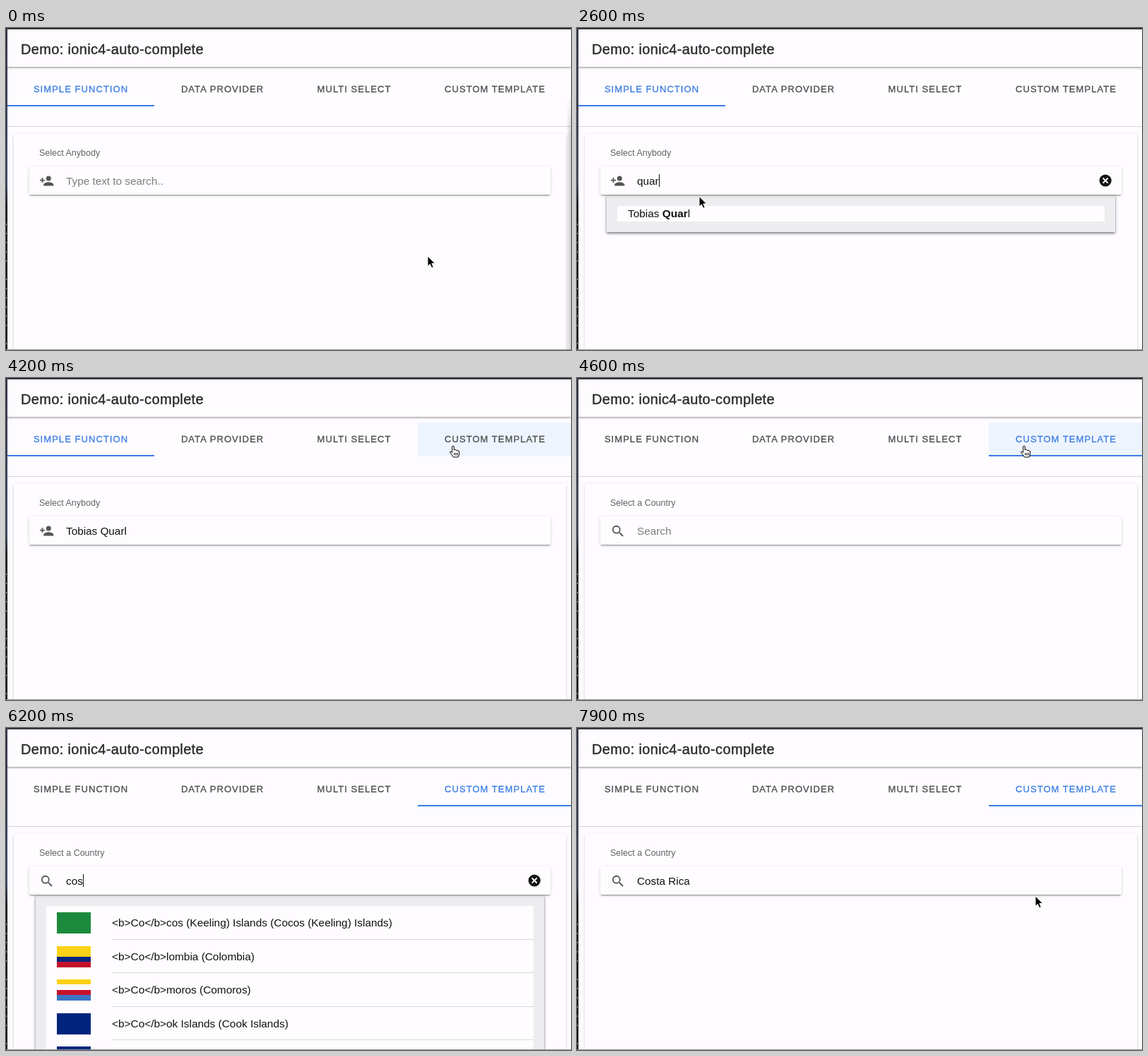
Animation, 800 px wide and 456 px high, one loop 8 s. Source, as an HTML page:

```html
<!DOCTYPE html>
<html lang="en">
<meta charset="utf-8">
<title>Auto-complete demo</title>
<style>
html, body { margin: 0; width: 100%; height: 100%; overflow: hidden; }
body { position: relative; background: #fefcff; color: #111; font: 15.3px "Liberation Sans", Arial, sans-serif; white-space: pre; }
div, svg { position: absolute; box-sizing: border-box; }
.raised { background: #fefcff; border-radius: 2px; box-shadow: 0 3px 1px -2px #0003, 0 2px 2px #00000024, 0 1px 5px #0000001f; }
#head { left: 0; top: 0; width: 800px; height: 55px; padding-left: 21px; font-size: 20px; line-height: 60px; letter-spacing: .34px; color: #2b2b2d; -webkit-text-stroke: .4px; box-shadow: 0 1px 3px #0007; }
#tabs { left: 0; top: 0; }
.tab { top: 63px; height: 48px; line-height: 47px; text-align: center; font-size: 13px; letter-spacing: 1.05px; color: #4c4b4e; -webkit-text-stroke: .3px; }
.tab.on { color: #3b7de4; border-bottom: 2px solid; }
.tab.hover { background: #eef4fe; }
#rule { left: 0; top: 139px; width: 800px; height: 1px; background: #d6d5d8; }
#card { left: 11px; top: 150px; width: 782px; height: 330px; }
#label { left: 47px; top: 167px; line-height: 20px; font-size: 12.5px; color: #626164; }
#list { left: 42px; top: 237px; width: 720px; padding: 15px; background: #edecee; box-shadow: 0 2px 3px #0006, 0 1px 5px #0003; }
.row { position: relative; height: 47.5px; line-height: 48px; padding-left: 93px; font-size: 15.4px; background: #fefcff; }
.row::after { content: ""; position: absolute; left: 93px; right: 0; bottom: 0; height: 1px; background: #d9d8db; }
.row.short { height: 22px; line-height: 22px; padding-left: 15px; }
.row.short::after { display: none; }
.flag { left: 15px; top: 9px; width: 48px; height: 30px; }
#field { left: 33px; top: 196px; width: 738px; height: 40px; padding-left: 52px; line-height: 41px; }
#hint { color: #7d7c7f; }
#caret { display: inline-block; width: 1px; height: 18px; margin-right: -1px; vertical-align: -3px; background: #111; }
#shade { left: 793px; top: 95px; width: 7px; height: 361px; background: linear-gradient(90deg, #0000, #0003); -webkit-mask: linear-gradient(#0000, #000 60px); mask: linear-gradient(#0000, #000 60px); }
#left { left: 0; top: 0; width: 2px; height: 456px; background: linear-gradient(#30334a, #3d4663 220px, #101014 255px); }
#left div { left: 0; width: 1px; height: 2px; background: #bbb; }
#top { left: 0; top: 0; width: 800px; height: 2px; background: linear-gradient(#25242b, #4b4a52); }
#bottom { left: 0; top: 455px; width: 800px; height: 1px; background: #929194; }
svg { left: 0; top: 0; width: 800px; height: 456px; }
</style>
<body>
<div id="rule"></div>
<div id="head">Demo: ionic4-auto-complete</div>
<div id="tabs"></div>
<div id="card" class="raised"></div>
<div id="label"></div>
<div id="list"></div>
<div id="field" class="raised"><span id="typed"></span><i id="caret"></i><span id="hint"></span></div>
<div id="shade"></div><div id="left"></div><div id="top"></div><div id="bottom"></div>
<svg>
  <g fill="#565558">
    <path id="person" transform="translate(47.1 205.9) scale(.88)" d="M15 12a4 4 0 1 0 0-8 4 4 0 0 0 0 8zM6 10V7H4v3H1v2h3v3h2v-3h3v-2zM15 14c-2.67 0-8 1.34-8 4v2h16v-2c0-2.66-5.33-4-8-4z"/>
    <path id="lens" transform="translate(47.3 206.2) scale(.9)" d="M15.5 14h-.8l-.3-.3a6.5 6.5 0 1 0-.7.7l.3.3v.8l5 5 1.5-1.5zM9.5 14a4.5 4.5 0 1 1 0-9 4.5 4.5 0 0 1 0 9z" fill-rule="evenodd"/>
  </g>
  <g id="clear" transform="translate(748.2 216)">
    <circle r="8.6" fill="#151517"/>
    <path d="M-3.5-3.5l7 7m0-7l-7 7" stroke="#fff" stroke-width="1.8"/>
  </g>
  <g id="pointer">
    <path id="arrow" d="M0 0v14.5l3.3-3.1 2.4 5.4 2.5-1.1-2.3-5.3h4.6z" fill="#000" stroke="#fff"/>
    <path id="hand" d="M-1.3 1q1.3-2 2.6 0v5l1-.7 1.7.4.5.8 1.8-.2.7 1.2 1.7.3v4l-1.4 4.2h-6.8l-2-3-2.8-3.3q-.5-2 1.5-1.4l1.5 1.5zM1.8 10v3.5m2.2-3.5v3.5m2.2-3.5v3.5" fill="#fff" stroke="#000"/>
    <path id="beam" d="M-2.5-8q2.5 0 2.5 2 0-2 2.5-2M0-6V6m-2.5 2q2.5 0 2.5-2 0 2 2.5 2" fill="none" stroke="#222"/>
  </g>
</svg>
<script>
const $ = id => document.getElementById(id);
const show = (id, on) => { $(id).style.display = on ? "" : "none"; };

const tabs = [["SIMPLE FUNCTION", 2, 210], ["DATA PROVIDER", 210, 403], ["MULTI SELECT", 403, 583], ["CUSTOM TEMPLATE", 583, 802]];
$("tabs").innerHTML = tabs.map(([name, from, to]) =>
  `<div class="tab" style="left:${from}px;width:${to - from}px">${name}</div>`).join("");

// Specks of the window behind
for (let i = 0; i < 14; i++) if (i % 7 != 5)
  $("left").innerHTML += `<div style="top:${277 + i * 13}px"></div>`;

const stripes = (...bands) => {
  let end = 0;
  return bands.map(([color, size]) => `${color} ${end}% ${end += size}%`).join();
};
const blue = "#00247d", red = "#c4122b", yellow = "#fcd116", white = "#fff";
const countries = [
  ["Cocos (Keeling) Islands", stripes(["#1c8a3c", 100])],
  ["Colombia", stripes([yellow, 50], [blue, 25], [red, 25])],
  ["Comoros", stripes([yellow, 25], [white, 25], [red, 25], ["#3a75c4", 25])],
  ["Cook Islands", stripes([blue, 100])],
  ["Costa Rica", stripes([blue, 17], [white, 16], [red, 34], [white, 16], [blue, 17])]
];
const personRow = `<div class="row short">Tobias <b>Quar</b>l</div>`;

// Typed text and its start time
const typing = [[0, ""], [1300, "q"], [1400, "qu"], [1600, "qua"], [1900, "quar"], [3200, "Tobias Quarl"],
  [4400, ""], [5700, "c"], [5800, "co"], [6200, "cos"], [6300, "cost"], [7000, "Costa Rica"]];

// Pointer path: time, x, y
const path = [[0, 597, 323], [100, 590, 318], [600, 180, 215], [2400, 180, 215], [2800, 166, 262], [3100, 166, 262],
  [3500, 419.5, 183], [4000, 585, 128], [4200, 633, 96], [4700, 633, 96], [5000, 320, 215], [6400, 320, 215],
  [6700, 219, 270], [7300, 219, 270], [7500, 275, 291], [7900, 649, 238], [8000, 649, 238]];

function pointerAt(t) {
  const i = path.findIndex(p => p[0] > t), [t0, x0, y0] = path[i - 1], [t1, x1, y1] = path[i];
  const u = (t - t0) / (t1 - t0), k = u * u * (3 - 2 * u);
  return [x0 + (x1 - x0) * k, y0 + (y1 - y0) * k];
}

function countryRows(query) {
  const n = query.length;
  return countries.filter(([name]) => name.toLowerCase().startsWith(query)).map(([name, flag]) =>
    `<div class="row"><div class="flag" style="background:linear-gradient(${flag})"></div>` +
    `&lt;b&gt;${name.slice(0, n)}&lt;/b&gt;${name.slice(n)} (${name})</div>`).join("");
}

let last = "";
function draw(now) {
  const t = Math.floor(now % 8000 / 100) * 100;
  const within = (from, to) => t >= from && t < to;
  const custom = t >= 4400;
  const text = typing.findLast(step => step[0] <= t)[1];

  $("label").textContent = custom ? "Select a Country" : "Select Anybody";
  $("typed").textContent = text;
  $("hint").textContent = text ? "" : custom ? "Search" : "Type text to search..";
  show("person", !custom);
  show("lens", custom);
  show("caret", within(700, 3200) || within(4900, 5100) || within(5600, 6700));
  show("clear", within(1300, 3200) || within(5700, 6700));
  show("shade", t < 700);

  const open = within(2300, 3200) || within(5900, 7000);
  const rows = !open ? "" : custom ? countryRows(t < 6400 ? "co" : "cost") : personRow;
  if (rows != last) $("list").innerHTML = last = rows;
  show("list", open);

  const [x, y] = pointerAt(t);
  const inTabs = y > 63 && y < 111;
  const kind = inTabs || open && y > 245 ? "hand" : y > 196 && y < 236 && x < 771 ? "beam" : "arrow";
  for (const id of ["arrow", "hand", "beam"]) show(id, id == kind);
  show("pointer", !within(1300, 2400) && !within(5100, 6400));
  $("pointer").setAttribute("transform", `translate(${x} ${y})`);

  [...$("tabs").children].forEach((tab, i) => {
    tab.classList.toggle("on", i == (custom ? 3 : 0));
    tab.classList.toggle("hover", inTabs && x >= tabs[i][1] && x < tabs[i][2]);
  });
}

const start = performance.now();
function loop() {
  draw(performance.now() - start);
  requestAnimationFrame(loop);
}
loop();
</script>
</body>
</html>
```
